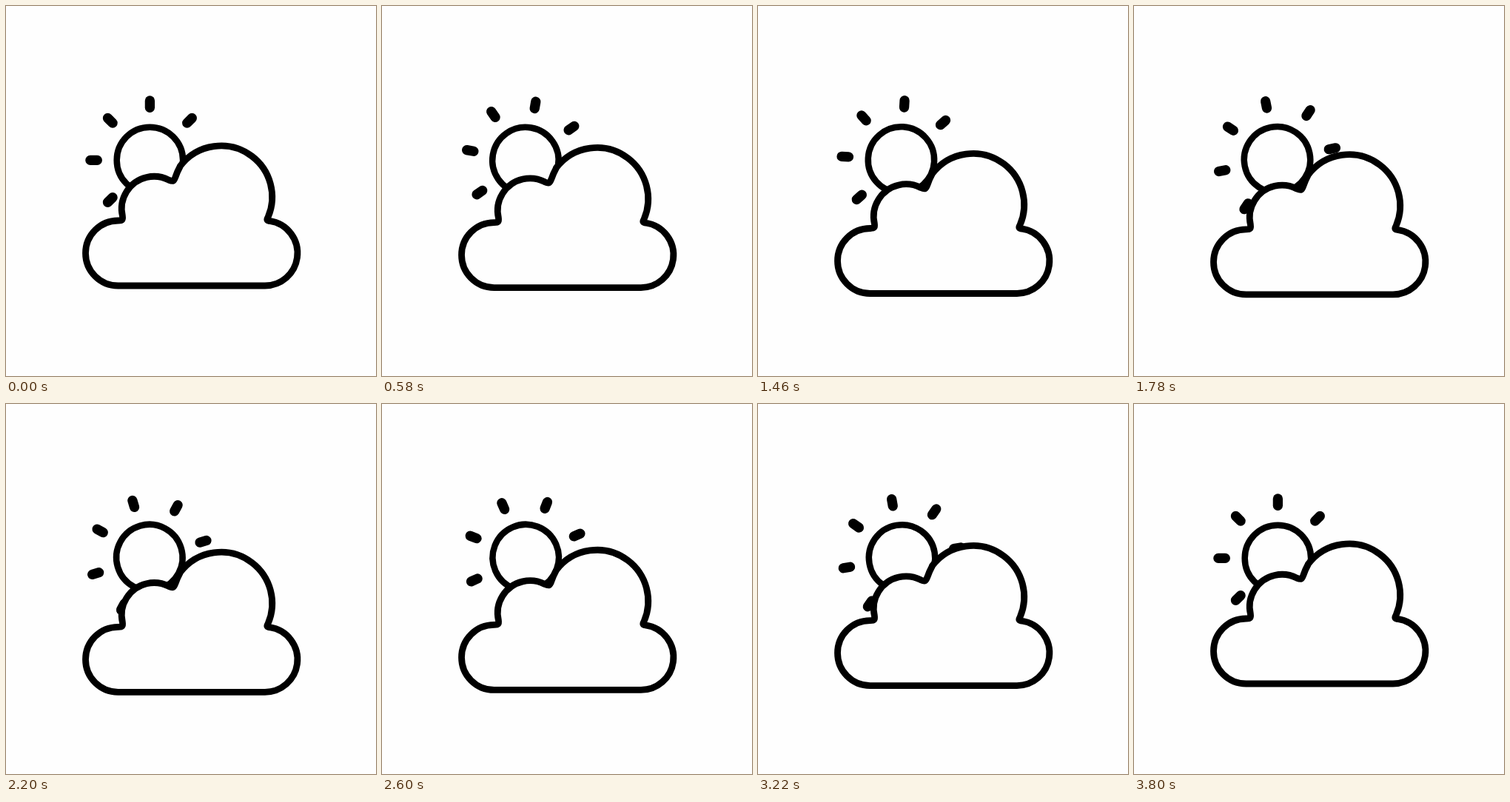
Recreate the animation shown at these times as an HTML page with a canvas. Size 500x500 px, loop 3840 ms.

```html
<!DOCTYPE html>
<html lang="en">
<head>
<meta charset="utf-8">
<title>Sun and cloud</title>
<style>
  html, body { margin: 0; width: 100%; height: 100%; overflow: hidden; background: #fefefe; }
  canvas { display: block; width: 500px; height: 500px; }
</style>
</head>
<body>
<canvas id="stage" width="500" height="500"></canvas>
<script>
const canvas = document.getElementById('stage');
const ctx = canvas.getContext('2d');
const ratio = window.devicePixelRatio || 1;
canvas.width = canvas.height = 500 * ratio;

const LOOP = 3840, TURN = 3800, STEP = 20;
const PAPER = '#fefefe', INK = '#000';
const DRIFT = 12;

// Arc between two points given relative to the centre.
function lobe(path, cx, cy, r, from, to) {
  path.arc(cx, cy, r, Math.atan2(from[1], from[0]), Math.atan2(to[1], to[0]));
}

function makeCloud() {
  const p = new Path2D();
  lobe(p, 151.5, 334, 44, [0, 44], [0.5, -44]);
  p.bezierCurveTo(157, 290, 158.2, 289, 157.4, 284);
  lobe(p, 200, 274, 43.7, [-42.6, 10], [20, -39]);
  p.bezierCurveTo(226, 237.8, 226.8, 236.8, 228.8, 231.5);
  p.quadraticCurveTo(231.5, 223.5, 235.4, 216.5);
  lobe(p, 290.5, 258.1, 69.2, [-55.1, -41.6], [63.5, 27.2]);
  p.bezierCurveTo(352.2, 288.6, 352, 290, 356, 290.6);
  lobe(p, 349.9, 334, 44, [6.1, -43.4], [0, 44]);
  p.closePath();
  return p;
}
const cloud = makeCloud();

function drawSun(turn) {
  ctx.save();
  ctx.translate(194, 208);
  ctx.rotate(turn * 2 * Math.PI);
  ctx.translate(0.4, 0.4);
  ctx.lineWidth = 8.5;
  ctx.beginPath();
  ctx.arc(0, 0, 44.7, 0, 2 * Math.PI);
  ctx.stroke();
  ctx.lineWidth = 13.3;
  for (let i = 0; i < 8; i++) {
    ctx.beginPath();
    ctx.moveTo(0, -71.1);
    ctx.lineTo(0, -80.5);
    ctx.stroke();
    ctx.rotate(Math.PI / 4);
  }
  ctx.restore();
}

function drawCloud(turn) {
  ctx.save();
  ctx.translate(0, DRIFT * (1 - Math.cos(turn * 2 * Math.PI)) / 2);
  ctx.lineWidth = 8.8;
  ctx.fill(cloud);
  ctx.stroke(cloud);
  ctx.restore();
}

function draw(ms) {
  const t = Math.min(Math.floor(ms % LOOP / STEP) * STEP, TURN);
  const turn = t / TURN;
  ctx.setTransform(ratio, 0, 0, ratio, 0, 0);
  ctx.fillStyle = PAPER;
  ctx.strokeStyle = INK;
  ctx.lineCap = ctx.lineJoin = 'round';
  ctx.fillRect(0, 0, 500, 500);
  drawSun(turn);
  drawCloud(turn);
}

const start = performance.now();
function tick() {
  draw(performance.now() - start);
  requestAnimationFrame(tick);
}
tick();
</script>
</body>
</html>
```
